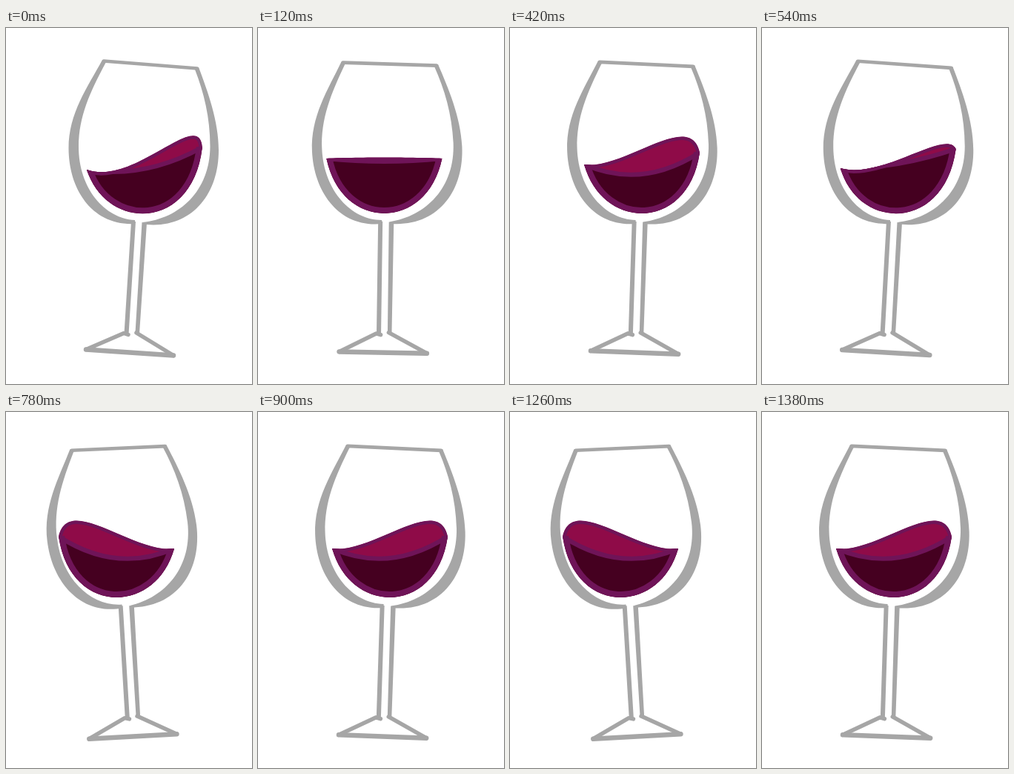
Write an HTML page that moves like this. It is 332 px wide and 480 px high and loops after 1.44 s.

```html
<!DOCTYPE html>
<html lang="en">
<head>
<meta charset="utf-8">
<title>Swirling wine glass</title>
<style>
  html, body { margin: 0; width: 100%; height: 100%; overflow: hidden; background: #fff; }
  svg { display: block; width: 100vw; height: 100vh; }
</style>
</head>
<body>
<svg viewBox="0 0 332 480">
  <defs><clipPath id="clip"><path id="shape"/></clipPath></defs>
  <g id="glass" fill="#a6a6a6" stroke="#a6a6a6" stroke-linejoin="round" stroke-linecap="round">
    <g stroke="none">
      <path d="M130 43C110 80 84.5 115 84.5 162C84.5 218 117 267 174 264L174 259C133 257 98 216 98 160C98 119 114 85 135 46Z"/>
      <path d="M260 53C272 85 287 125 287 165C287 225 250 270 190 265L184 262C234 257 275 220 275.5 160C275.5 120 267 87 255 56Z"/>
      <path d="M169 261L175 261L165.5 413L159.5 412ZM183.5 262L190 263L180 412L174.5 411Z"/>
    </g>
    <g fill="none">
      <path stroke-width="4.7" d="M132 44.5L258 54.5"/>
      <path stroke-width="5.5" d="M165 413.5L159 411.5L108 433.5M176 411L226 441.5"/>
      <path stroke-width="6.5" d="M108 433.5L226 441.5"/>
    </g>
  </g>
  <g clip-path="url(#clip)" fill="none" stroke="#6f1458">
    <path id="back" fill="#8f0b48" stroke="none"/>
    <path id="front" fill="#450020" stroke="none"/>
    <path id="edge" stroke-width="6"/>
    <path id="top" stroke-width="9"/>
    <path id="bottom" stroke-width="16"/>
  </g>
</svg>
<script>
const STEP = 60, STEPS = 8, TURN = 2 * Math.PI / STEPS;
const set = (id, name, value) => document.getElementById(id).setAttribute(name, value);
const pts = (...list) => list.map(([x, y]) => x.toFixed(2) + ' ' + y.toFixed(2)).join(' ');

// Lean of the glass in degrees, zero at step 0
const swing = p => 3.85 * Math.cos(p * TURN - 0.25);

function drawGlass(p) {
  set('glass', 'transform', `rotate(${swing(p) - swing(0)} 169 402)`);
}

// The wine tilts from side to side while its surface opens and closes
function drawWine(p) {
  const tilt = Math.cos(p * TURN), open = -Math.sin(p * TURN);
  const mid = 166.4 + 20.5 * tilt - 4 * open;

  // side: -1 for the left end, 1 for the right
  const end = side => {
    const lift = -side * tilt;
    const x = mid + side * 78, y = 176 + lift * (15 - 5 * open);
    return {
      tip: [x, y],
      over: [x - side * (34 + 30 * lift), y - 16 - 14 * open + lift * (39 + 11 * open)],
      under: [x - side * (20 + 7 * lift), 274.5]
    };
  };
  const l = end(-1), r = end(1);
  const sag = [mid, 178 + 2 * (13 + 10 * open)];

  const start = 'M' + pts(l.tip);
  const top = 'C' + pts(l.over, r.over, r.tip);
  const bottom = 'C' + pts(r.under, l.under, l.tip);
  const edge = start + 'Q' + pts(sag, r.tip);

  set('shape', 'd', start + top + bottom + 'Z');
  set('back', 'd', start + top + bottom + 'Z');
  set('front', 'd', edge + bottom + 'Z');
  set('edge', 'd', edge);
  set('top', 'd', start + top);
  set('bottom', 'd', 'M' + pts(r.tip) + bottom);
}

const t0 = performance.now();
function tick() {
  const t = Math.max(0, performance.now() - t0);
  const p = Math.floor(t / STEP) % STEPS;
  drawGlass(p);
  drawWine(p);
  requestAnimationFrame(tick);
}
tick();
</script>
</body>
</html>
```
